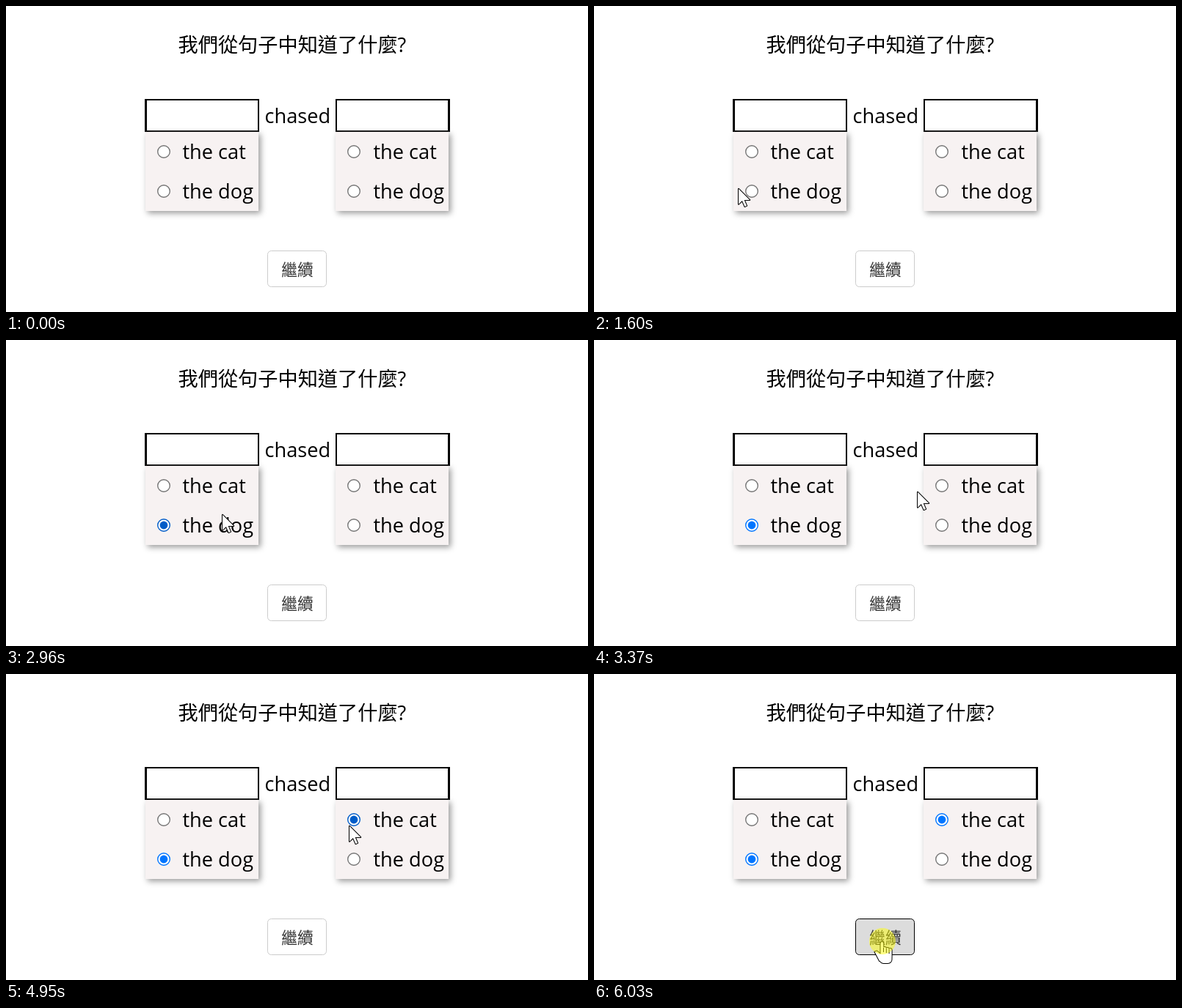
An HTML page with a canvas that plays this animation: 793 px wide and 418 px high, repeating every 6.16 s.

```html
<!DOCTYPE html>
<html lang="zh-Hant">
<head>
<meta charset="utf-8">
<title>我們從句子中知道了什麼?</title>
<style>
  html, body { margin: 0; width: 100%; height: 100%; overflow: hidden; background: #fff; }
  canvas { display: block; width: 793px; height: 418px; }
</style>
</head>
<body>
<canvas id="stage" width="793" height="418"></canvas>
<script>
const ctx = document.getElementById('stage').getContext('2d');
const LOOP = 6160;
const STEP = 68.5; // the pointer is redrawn at about 15 steps a second
const TEXT = 27.2;
const FAMILY = '"Open Sans", "Noto Sans CJK TC", "Noto Sans CJK", sans-serif';

// Each glide ends in a click; rise and fall shape its easing
const glides = [
  { from: [13, 147], to: [212, 255], bend: [-7, 6], start: 850, end: 1930, rise: 1, fall: 2.15, press: 2070, release: 2220 },
  { from: [212, 255], to: [473, 199], bend: [0, 0], start: 2610, end: 4070, rise: 2, fall: 6.7, press: 4290, release: 4420 },
  { from: [473, 199], to: [393, 365], bend: [-20, -15], start: 4880, end: 5780, rise: 1.6, fall: 3.2, press: 6030, release: LOOP }
];

function pointer(t) {
  const g = glides.findLast(g => t >= g.start);
  if (!g) return null;
  const elapsed = STEP * Math.floor((t - g.start) / STEP + .25);
  const u = Math.min(1, elapsed / (g.end - g.start));
  const s = 1 - (1 - u ** g.rise) ** g.fall;
  const [x, y] = g.from.map((p, i) =>
    Math.round(p + (g.to[i] - p) * s + 2 * s * (1 - s) * g.bend[i]));
  return { x, y, pressed: t >= g.press && t < g.release };
}

function text(str, x, y, size = TEXT, color = '#000') {
  ctx.font = `${size}px ${FAMILY}`;
  ctx.fillStyle = color;
  ctx.fillText(str, x, y);
}

function rect(x, y, w, h, color) {
  ctx.fillStyle = color;
  ctx.fillRect(x, y, w, h);
}

function disc(x, y, r, color) {
  ctx.beginPath();
  ctx.arc(x, y, r, 0, Math.PI * 2);
  ctx.fillStyle = color;
  ctx.fill();
}

function radio(x, y, checked, hover) {
  const color = checked ? (hover ? '#005cc8' : '#0075ff') : (hover ? '#4f4f4f' : '#767676');
  disc(x, y, 8.3, '#fff');
  ctx.strokeStyle = color;
  ctx.lineWidth = 1.4;
  ctx.stroke();
  if (checked) disc(x, y, 5.4, color);
}

function menu(x, innerX, panelX, radioX, picked, pos) {
  rect(x, 127, 156, 45, '#000');
  rect(innerX, 129, 151, 41, '#fff');

  ctx.save();
  ctx.shadowColor = '#999';
  ctx.shadowBlur = 8;
  ctx.shadowOffsetX = ctx.shadowOffsetY = 3;
  rect(panelX, 172, 154, 108, '#f7f2f2');
  ctx.restore();

  ['the cat', 'the dog'].forEach((label, i) => {
    const y = 199 + 54 * i;
    const hover = pos && pos.x >= radioX - 9 && pos.x < radioX + 122 && Math.abs(pos.y - y) < 27;
    radio(radioX, y, picked === i, hover);
    text(label, x + 51.5, y + 10);
  });
}

function button(hover, active) {
  ctx.beginPath();
  ctx.roundRect(356.5, 334.5, 80, 49, 5);
  ctx.fillStyle = active ? '#dcdcdc' : hover ? '#e6e6e6' : '#fff';
  ctx.fill();
  ctx.strokeStyle = active ? '#000' : hover ? '#adadad' : '#ccc';
  ctx.lineWidth = 1;
  ctx.stroke();
  text('繼續', 375.3, 368, TEXT * .8, '#333');
}

function polygon(...points) {
  points.forEach(([x, y], i) => i ? ctx.lineTo(x, y) : ctx.moveTo(x, y));
  ctx.closePath();
}

// Filling over a double-width stroke leaves one outline around joined shapes
function outlined(build) {
  ctx.beginPath();
  build();
  ctx.strokeStyle = '#000';
  ctx.lineWidth = 2;
  ctx.lineJoin = 'round';
  ctx.stroke();
  ctx.fillStyle = '#fff';
  ctx.fill();
}

function arrow() {
  outlined(() => polygon([1, 1.8], [1, 22.8], [5.9, 18.1], [9.5, 26], [12.1, 24.9], [8.7, 17], [16.2, 17]));
}

function hand() {
  outlined(() => {
    ctx.roundRect(-2.5, 1, 3.8, 20, 1.9);
    for (let i = 1; i < 4; i++) ctx.roundRect(3.8 * i - 2.8, 7 + i, 4, 14, 2);
    ctx.roundRect(-3.5, 15, 16, 15, 5);
    polygon([-10.5, 14.5], [-7.5, 13.5], [-2, 18], [2, 29], [-4, 27]);
  });
  for (let i = 1; i < 4; i++) rect(3.8 * i - 2.8, 8 + i, 1, 6, '#000');
}

function draw(t) {
  const pos = pointer(t);
  const onButton = pos && pos.x >= 356 && pos.x < 437 && pos.y >= 334 && pos.y < 384;

  rect(0, 0, 793, 418, '#fff');
  text('我們從句子中知道了什麼?', 234.5, 62.5);
  text('chased', 352.5, 160);
  menu(189, 192, 190, 215, t >= glides[0].release ? 1 : -1, pos);
  menu(449, 451, 449, 474, t >= glides[1].release ? 0 : -1, pos);
  button(onButton, onButton && pos.pressed);

  if (!pos) return;
  ctx.save();
  ctx.translate(pos.x, pos.y);
  onButton ? hand() : arrow();
  if (pos.pressed) disc(0, 0, 18, 'rgba(255, 255, 0, .48)');
  ctx.restore();
}

const start = performance.now();
function tick() {
  draw((performance.now() - start) % LOOP);
  requestAnimationFrame(tick);
}
tick();
</script>
</body>
</html>
```
